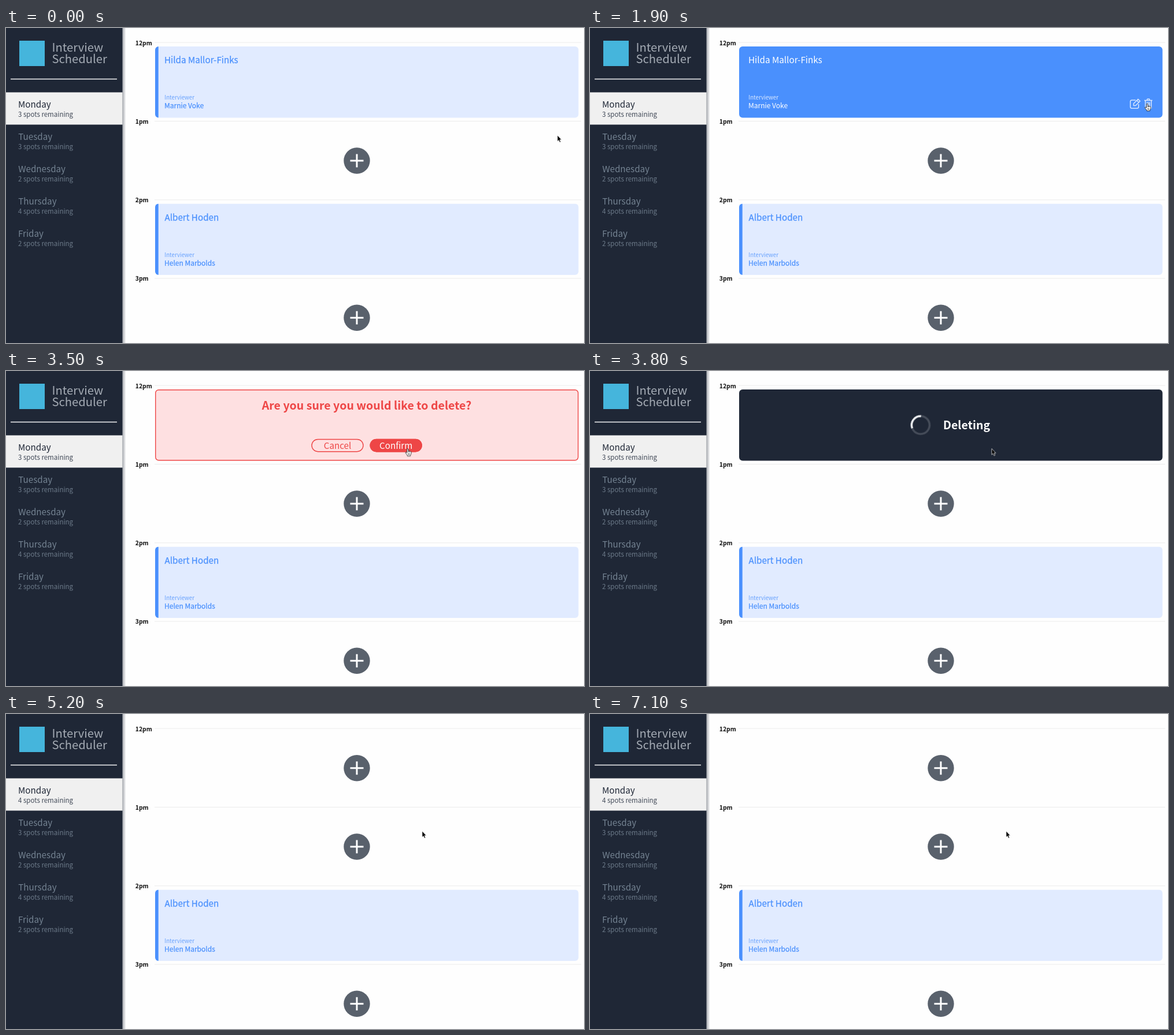
Write an HTML page that moves like this. It is 1000 px wide and 546 px high and loops after 7200 ms.

```html
<!DOCTYPE html>
<html lang="en">
<head>
<meta charset="utf-8">
<title>Interview Scheduler</title>
<style>
  html, body { margin: 0; width: 100%; height: 100%; overflow: hidden; background: #fefefe; }
  svg { display: block; width: 100%; height: 100%; }
  text { font-family: "Noto Sans CJK JP", "Noto Sans CJK SC", "Noto Sans", sans-serif; white-space: pre; }

  .logo { font-size: 20.2px; font-weight: 300; fill: #a4abb4; }
  .day { font-size: 15.2px; }
  .spots { font-size: 11.5px; font-weight: 300; }
  .idle { fill: #748392; }
  .idle .spots { fill: #6c7a89; }
  .active { fill: #1f2736; }
  .active .spots { fill: #414957; }
  .hour { font-size: 10.4px; font-weight: 700; fill: #111; }
  .name { font-size: 15.2px; }
  .label { font-size: 9.7px; font-weight: 300; fill-opacity: .8; }
  .person { font-size: 12px; }
  .blue { fill: #4a90fd; }
  .white { fill: #fff; }
  .blue .name, .blue .person { stroke: #4a90fd; stroke-width: .25px; }
  .big { font-size: 19.6px; font-weight: 700; }
  .button { font-size: 15.2px; }
  .red { fill: #ee4646; }

  .anim { animation: 7.2s step-end infinite; }
  .normal { animation-name: normal; }
  .hover { animation-name: hover; }
  .confirm { animation-name: confirm; }
  .plain { animation-name: plain; }
  .filled { animation-name: filled; }
  .deleting { animation-name: deleting; }
  .empty { animation-name: empty; }
  .before { animation-name: before; }
  .after { animation-name: after; }
  .arrow { animation-name: arrow; }
  .hand { animation-name: hand; }
  .cursor { animation: move 7.2s linear infinite; }
  .spin { animation: spin 7.2s linear infinite; transform-origin: 572px 93.7px; }

  @keyframes normal { 0% { opacity: 1 } 16.66%, 100% { opacity: 0 } }
  @keyframes hover { 0% { opacity: 0 } 16.66% { opacity: 1 } 33.33%, 100% { opacity: 0 } }
  @keyframes confirm { 0% { opacity: 0 } 33.33% { opacity: 1 } 51.38%, 100% { opacity: 0 } }
  @keyframes plain { 0% { opacity: 1 } 43.05%, 100% { opacity: 0 } }
  @keyframes filled { 0% { opacity: 0 } 43.05%, 100% { opacity: 1 } }
  @keyframes deleting { 0% { opacity: 0 } 51.38% { opacity: 1 } 66.66%, 100% { opacity: 0 } }
  @keyframes empty { 0% { opacity: 0 } 66.66%, 100% { opacity: 1 } }
  @keyframes before { 0% { opacity: 1 } 63.88%, 100% { opacity: 0 } }
  @keyframes after { 0% { opacity: 0 } 63.88%, 100% { opacity: 1 } }
  @keyframes arrow {
    0% { opacity: 1 } 19.44% { opacity: 0 } 33.33% { opacity: 1 }
    43.05% { opacity: 0 } 51.38%, 100% { opacity: 1 }
  }
  @keyframes hand {
    0% { opacity: 0 } 19.44% { opacity: 1 } 33.33% { opacity: 0 }
    43.05% { opacity: 1 } 51.38%, 100% { opacity: 0 }
  }
  @keyframes move {
    0% { transform: translate(954px, 186px) }
    6.94% { transform: translate(954px, 186px); animation-timing-function: steps(6) }
    15.27% { transform: translate(945px, 155px); animation-timing-function: steps(4) }
    20.83% { transform: translate(964px, 131px) }
    34.72% { transform: translate(964px, 131px); animation-timing-function: steps(6) }
    43.05% { transform: translate(695px, 134.5px) }
    55.55% { transform: translate(695px, 134.5px); animation-timing-function: steps(5) }
    62.5%, 100% { transform: translate(720px, 203px) }
  }
  @keyframes spin {
    0% { transform: rotate(0deg) }
    51.38% { transform: rotate(0deg); animation-timing-function: steps(11) }
    66.66%, 100% { transform: rotate(396deg) }
  }
</style>
</head>
<body>
<svg viewBox="0 0 1000 546" preserveAspectRatio="none">
  <defs>
    <linearGradient id="shade">
      <stop offset="0" stop-color="#1f2736" stop-opacity=".38"/>
      <stop offset="1" stop-color="#1f2736" stop-opacity="0"/>
    </linearGradient>
    <clipPath id="round"><rect x="258" y="32" width="732.5" height="123.5" rx="6"/></clipPath>
    <g id="add">
      <circle r="22.7" fill="#59616c"/>
      <path d="M-11.5 0H11.5M0-11.5V11.5" stroke="#fff" stroke-width="3"/>
    </g>
    <g id="card" clip-path="url(#round)">
      <path fill="#e1ebff" d="M258 32h733v124h-733z"/>
      <path fill="#4a90fd" d="M258 32h5.7v124h-5.7z"/>
    </g>
  </defs>

  <rect width="1000" height="546" fill="#fefefe"/>
  <rect x="201.6" width="6" height="546" fill="url(#shade)"/>
  <rect width="201.6" height="546" fill="#1f2736"/>

  <rect x="23" y="22" width="44" height="44" fill="#45b5dc"/>
  <text class="logo" x="79.5" y="41">Interview</text>
  <text class="logo" x="79.5" y="61">Scheduler</text>
  <path d="M8 88.4H192" stroke="#f4f4f4" stroke-width="1.5"/>

  <rect y="111.5" width="201.6" height="56" fill="#f0f0f0"/>
  <g class="active">
    <text class="day" x="21" y="137.7">Monday</text>
    <text class="spots anim before" x="21" y="154">3 spots remaining</text>
    <text class="spots anim after" x="21" y="154">4 spots remaining</text>
  </g>
  <g class="idle">
    <text class="day" x="21.2" y="194">Tuesday</text>
    <text class="spots" x="21" y="210">3 spots remaining</text>
    <text class="day" x="21.2" y="250">Wednesday</text>
    <text class="spots" x="21" y="266">2 spots remaining</text>
    <text class="day" x="21.2" y="306">Thursday</text>
    <text class="spots" x="21" y="322">4 spots remaining</text>
    <text class="day" x="21" y="362">Friday</text>
    <text class="spots" x="21" y="378">2 spots remaining</text>
  </g>

  <path d="M257 25.2H995M257 161.5H995M257 297.8H995M257 434H995" stroke="#ececec"/>
  <text class="hour" x="223.8" y="29.5">12pm</text>
  <text class="hour" x="223.8" y="165.8">1pm</text>
  <text class="hour" x="223.8" y="302">2pm</text>
  <text class="hour" x="223.8" y="438.2">3pm</text>

  <use href="#add" x="607" y="230"/>
  <use href="#add" x="607" y="502.3"/>
  <use href="#card" y="272.4"/>
  <g class="blue">
    <text class="name" x="274.5" y="333.5">Albert Hoden</text>
    <text class="label" x="274.3" y="396.7">Interviewer</text>
    <text class="person" x="274" y="411.7">Helen Marbolds</text>
  </g>

  <g class="anim normal">
    <use href="#card"/>
    <g class="blue">
      <text class="name" x="274" y="61">Hilda Mallor-Finks</text>
      <text class="label" x="274.3" y="124.3">Interviewer</text>
      <text class="person" x="274" y="139.3">Marnie Voke</text>
    </g>
  </g>

  <g class="anim hover">
    <rect x="258" y="32" width="732.5" height="123.5" rx="6" fill="#4a90fd"/>
    <g class="white">
      <text class="name" x="274" y="61">Hilda Mallor-Finks</text>
      <text class="label" x="274.3" y="124.3">Interviewer</text>
      <text class="person" x="274" y="139.3">Marnie Voke</text>
    </g>
    <g fill="none" stroke="#d5e5ff" stroke-width="1.5" stroke-linejoin="round">
      <path d="M944 125H937.5Q934.8 125 934.8 127.8V136.5Q934.8 139.2 937.5 139.2H946.5Q949.2 139.2 949.2 136.5V132"/>
      <path d="M940.5 134.5V131L948.2 123.3L951.7 126.8L944 134.5ZM946 125.5L949.5 129"/>
      <path d="M959 125.5H973M963.3 125.5L964.3 123H967.7L968.7 125.5M960.8 125.5V137.5Q960.8 139.7 963 139.7H969Q971.2 139.7 971.2 137.5V125.5M963.8 128.5V136.5M966 128.5V136.5M968.2 128.5V136.5"/>
    </g>
  </g>

  <g class="anim confirm">
    <rect x="258.7" y="32.7" width="731.1" height="122.1" rx="5.5" fill="#fee0e1" stroke="#ee4646" stroke-width="1.4"/>
    <text class="big red" x="624" y="67.3" text-anchor="middle">Are you sure you would like to delete?</text>
    <rect x="529" y="118.5" width="89" height="21.2" rx="10.6" fill="none" stroke="#ee4646" stroke-width="1.4"/>
    <text class="button red" x="573.5" y="134.8" text-anchor="middle">Cancel</text>
    <rect x="630.2" y="118.5" width="89" height="21.2" rx="10.6" fill="none" stroke="#ee4646" stroke-width="1.4"/>
    <text class="button red anim plain" x="674.7" y="134.8" text-anchor="middle">Confirm</text>
    <g class="anim filled">
      <rect x="629.5" y="117.8" width="90.4" height="22.6" rx="11.3" fill="#ee4646"/>
      <text class="button white" x="674.7" y="134.8" text-anchor="middle">Confirm</text>
    </g>
  </g>

  <g class="anim deleting">
    <rect x="258" y="32" width="732.5" height="123.5" rx="6" fill="#1f2736"/>
    <g class="spin" fill="none" stroke-width="3.4">
      <circle cx="572" cy="93.7" r="15.5" stroke="#454c59"/>
      <path d="M563.5 80.7A15.5 15.5 0 0 0 563.5 106.7" stroke="#eef0f2"/>
    </g>
    <text class="big white" x="611" y="101.3">Deleting</text>
  </g>

  <g class="anim empty"><use href="#add" x="607" y="93.7"/></g>

  <g class="cursor">
    <path class="anim arrow" d="M0 0V10.6L2.3 8.5L4 12.2L5.8 11.4L4.2 7.8H7.2Z" fill="#000" stroke="#fff" stroke-width=".7"/>
    <path class="anim hand" d="M-1.2 .8Q0-.6 1.1.8V4.3Q2.2 3.6 3 4.6Q4.2 4 4.8 5.2Q6.3 4.9 6.2 6.6Q6.2 9.5 4.8 11.2V12.7H-.8V11.3Q-2.5 9.5-4 7Q-3.7 5.5-2.3 6.4L-1.2 7.5ZM1.1 4.3V6.4M3 4.8V6.6M1 8.2V10.8M2.8 8.2V10.8" fill="#fff" stroke="#111" stroke-width=".8" stroke-linejoin="round"/>
  </g>
</svg>
</body>
</html>
```
